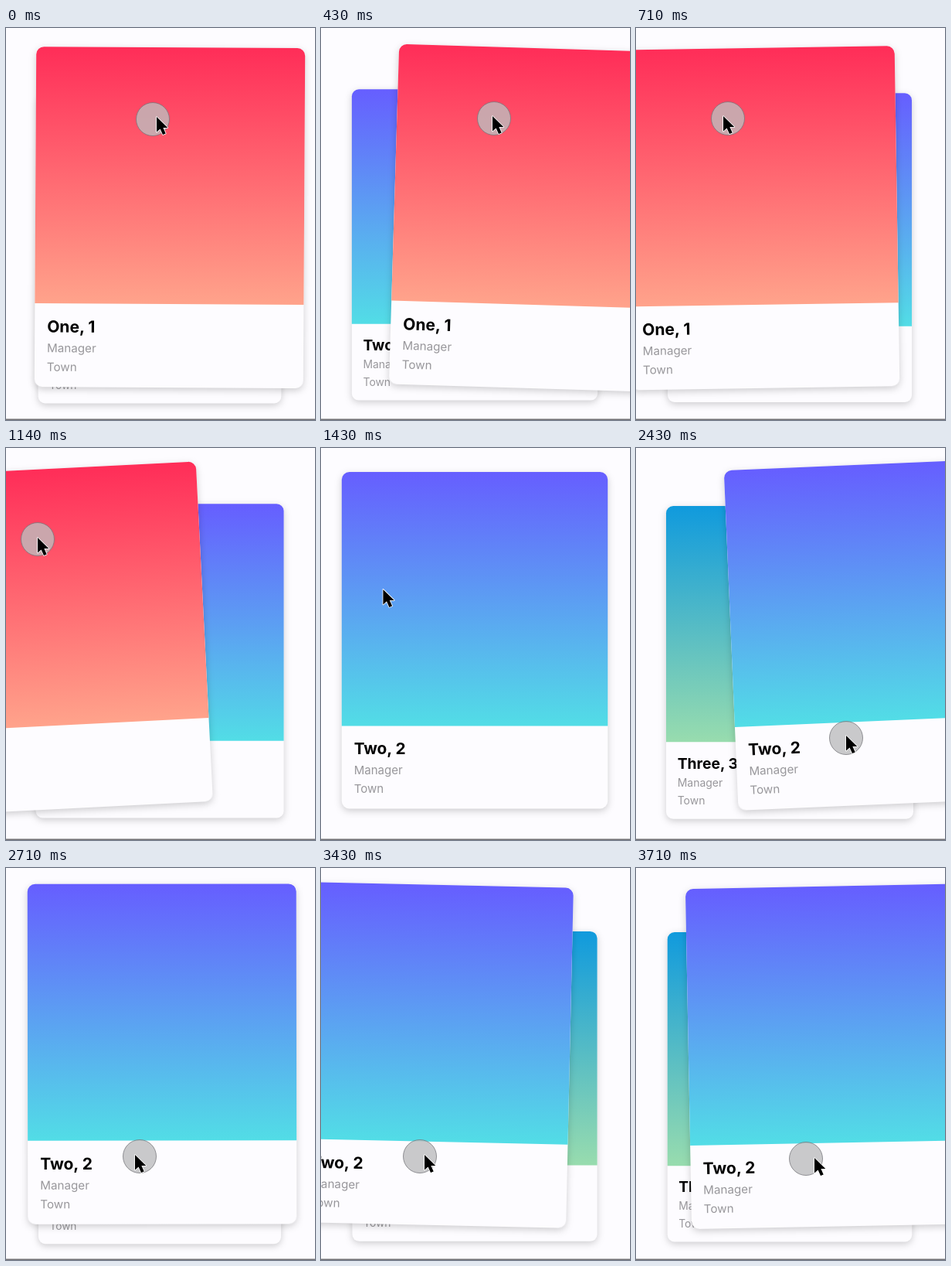
These frames come from a looping animation (400 px wide and 507 px high, 3.85 s). An HTML page:

```html
<!DOCTYPE html>
<html lang="en">
<head>
<meta charset="utf-8">
<title>Card swipe</title>
<style>
  html, body { margin: 0; width: 100%; height: 100%; overflow: hidden; background: #fdfcff; }
  svg { display: block; font-family: Inter, Roboto, sans-serif; }
  .base { fill: #fdfcff; filter: drop-shadow(0 3px 5px rgba(0, 0, 0, .19)); }
  .name { font-size: 21px; font-weight: 700; fill: #000; }
  .info { font-size: 15.2px; fill: #98979b; }
</style>
</head>
<body>
<svg id="stage" width="400" height="507" viewBox="0 0 400 507">
  <defs id="defs"></defs>
  <g id="deck"></g>
  <rect y="505.5" width="400" height="1.5" fill="#737275"/>
  <circle id="touch" r="21.5" fill="rgba(189,189,191,.8)" stroke="rgba(115,115,120,.75)"/>
  <path id="arrow" d="M0 0V19.6L4.6 15.4L8 23L11.7 21.4L8.4 14H14.3Z" fill="#000"
        stroke="#fff" stroke-width="1.6" stroke-linejoin="round" paint-order="stroke"/>
</svg>
<script>
const LOOP = 3850, FPS = 7;
const HOME = { x: 199, y: 244.6 };
const RELEASE = 8, SWAP = 11, PRESS = 14;
const TILT = 0.025, MAX_TILT = 4.5;
const $ = id => document.getElementById(id);

// step, card x, card y, touch x, touch y, arrow x, arrow y
const dragTop = [
  [0, 13, .5, 190, 118, 195, 115],
  [2, 85, 1, 241, 117, 242, 114],
  [3, 69.5, 1.2, 224, 117, 222, 114],
  [5, -35, 1.2, 119, 117, 113, 114],
  [8, -116, 1.3, 41, 118, 41, 116]
];
const dragBottom = [
  [14, 0, 0, 175, 378, 193, 374],
  [17, 98, -3, 272, 375, 272, 372],
  [19, 3, -4, 173, 373, 167, 371],
  [22, -106, -3.6, 72, 373, 73, 371],
  [24, -51, -2.7, 128, 373, 134, 371],
  [26, 43, -.8, 220, 376, 231, 375]
];

function addCard(name, from, to) {
  const id = 'fill' + name[0] + name[1];
  $('defs').insertAdjacentHTML('beforeend',
    `<linearGradient id="${id}" x2="0" y2="1">
      <stop stop-color="${from}"/><stop offset="1" stop-color="${to}"/>
    </linearGradient>`);
  const g = document.createElementNS('http://www.w3.org/2000/svg', 'g');
  g.innerHTML = `<g transform="translate(-174 -220)">
    <rect class="base" width="348" height="440" rx="10"/>
    <path d="M0 332V10A10 10 0 0 1 10 0H338A10 10 0 0 1 348 10V332Z" fill="url(#${id})"/>
    <text class="name" x="16" y="369.3">${name}</text>
    <text class="info" x="16" y="395">Manager</text>
    <text class="info" x="16" y="419.5">Town</text></g>`;
  $('deck').prepend(g);
  return g;
}

const one = addCard('One, 1', '#ff2d58', '#ffa38b');
const two = addCard('Two, 2', '#665eff', '#52dde6');
const three = addCard('Three, 3', '#109add', '#98dcae');

const mix = (a, b, p) => a + (b - a) * p;
const smooth = p => p * p * (3 - 2 * p);

// Smooth curve through the rows, slopes from neighbouring rows
function sample(rows, step) {
  let i = 0;
  while (i < rows.length - 2 && step >= rows[i + 1][0]) i++;
  const a = rows[i], b = rows[i + 1];
  const before = rows[i - 1] || a, after = rows[i + 2] || b;
  const span = b[0] - a[0], p = (step - a[0]) / span;
  return a.slice(1).map((v, k) => {
    const c = k + 1;
    const s0 = (b[c] - before[c]) / (b[0] - before[0]) * span;
    const s1 = (after[c] - a[c]) / (after[0] - a[0]) * span;
    return mix(v, b[c], smooth(p)) + p * (1 - p) * ((1 - p) * s0 - p * s1);
  });
}

function place(el, x, y, angle = 0, scale = 1) {
  el.setAttribute('transform',
    `translate(${HOME.x + x} ${HOME.y + y}) rotate(${angle}) scale(${scale})`);
}

function placeFront(card, x, y, side) {
  const angle = Math.max(-MAX_TILT, Math.min(MAX_TILT, x * TILT));
  place(card, x, y, angle * side);
}

// The card below rises with the drag, then fills the front place
function placeBack(card, x, rise = 0) {
  const pull = Math.abs(x);
  place(card, 0, mix(43.3 - .108 * pull, 0, rise), 0, mix(.902 + .00018 * pull, 1, rise));
}

function moveTo(el, x, y) {
  el.setAttribute('transform', `translate(${x} ${y})`);
}

const show = (el, on) => el.setAttribute('visibility', on ? 'visible' : 'hidden');

function pose(step) {
  if (step <= RELEASE) return sample(dragTop, step);
  if (step >= PRESS) return sample(dragBottom, step);
  const p = smooth((step - RELEASE) / (PRESS - RELEASE));
  const from = dragTop[dragTop.length - 1], to = dragBottom[0];
  const [, , , tx, ty, ax, ay] = from.map((v, i) => mix(v, to[i], p));
  const d = step - RELEASE;
  const x = step < SWAP ? from[1] - 80 * d - 30 * d * d : 0;
  return [x, step < SWAP ? from[2] : 0, tx, ty, ax, ay];
}

function draw(step) {
  const [x, y, tx, ty, ax, ay] = pose(step);
  const first = step < SWAP;
  show(one, first);
  show(three, !first);
  if (first) {
    const rise = Math.max(0, step - RELEASE) / (SWAP - RELEASE);
    placeFront(one, x, y, 1);
    placeBack(two, Math.max(x, dragTop[dragTop.length - 1][1]), Math.sin(rise * Math.PI / 2));
  } else {
    placeFront(two, x, y, -1);
    placeBack(three, x);
  }
  show($('touch'), step <= RELEASE || step >= PRESS);
  moveTo($('touch'), tx, ty);
  moveTo($('arrow'), ax, ay);
}

const start = performance.now();
function tick() {
  const t = (performance.now() - start) % LOOP;
  // frame times fall on whole hundredths of a second
  draw(Math.floor((Math.floor(t / 10) + .5) * FPS / 100));
  requestAnimationFrame(tick);
}
tick();
</script>
</body>
</html>
```
